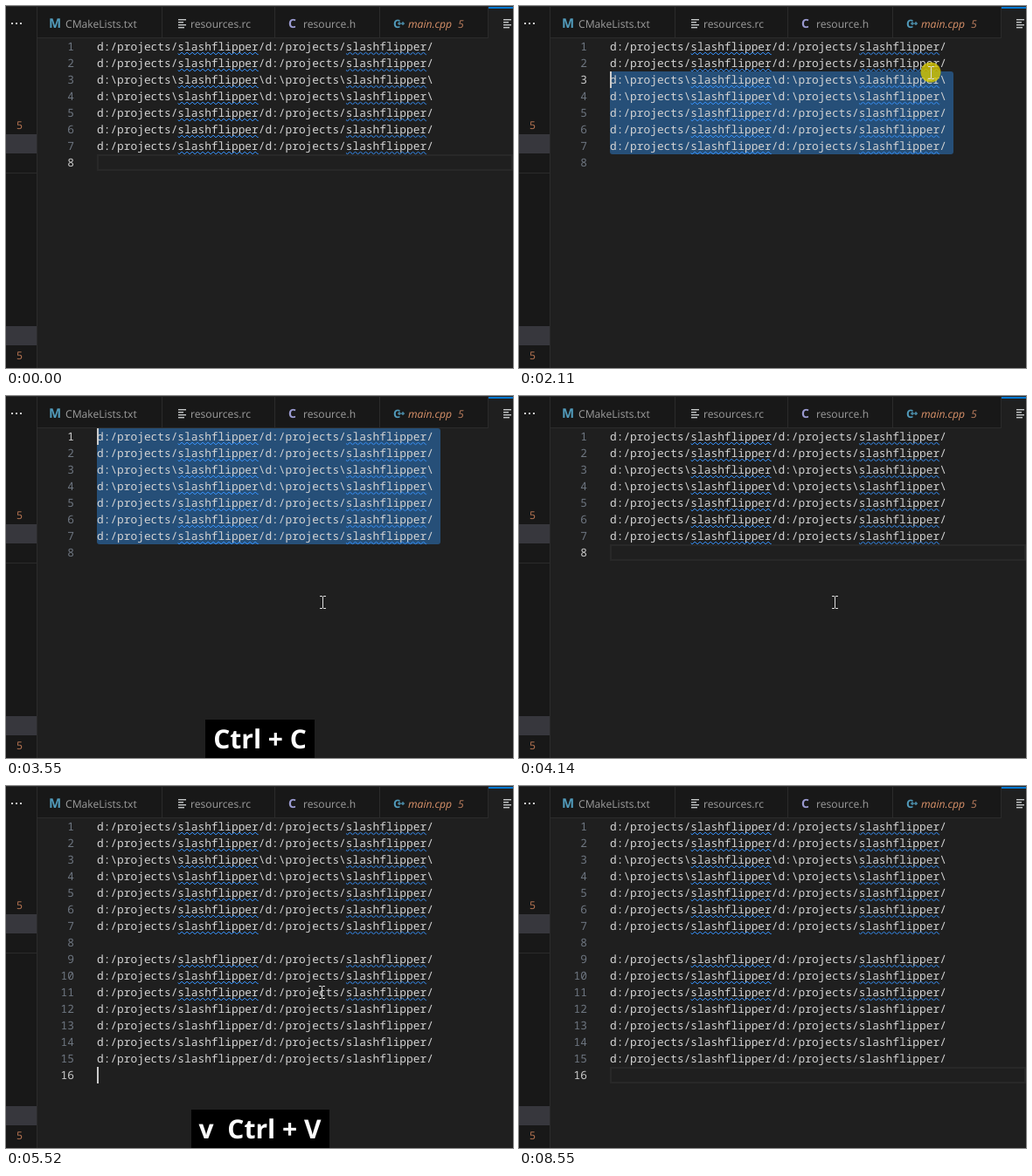
An HTML page with a canvas for the animation above (8650 ms loop, 580 by 415 pixels).

```html
<!DOCTYPE html>
<html lang="en">
<head>
<meta charset="utf-8">
<title>Editor</title>
<style>
html, body { margin: 0; width: 100%; height: 100%; overflow: hidden; background: #1f1f1f; }
canvas { display: block; }
</style>
</head>
<body>
<canvas id="stage" width="580" height="415"></canvas>
<script>
const ctx = document.getElementById('stage').getContext('2d');
const LOOP = 8650, TOP = 37, ROW = 19, LEFT = 104;
const MONO = '12.83px "Noto Sans Mono", monospace';
const UI = '12.15px "Open Sans", sans-serif';
const KEYS = 'bold 30px "Open Sans", sans-serif';
const CHAR = 7.697;
const slashed = 'd:/projects/slashflipper/'.repeat(2);
const flipped = slashed.replaceAll('/', '\\');

// Pointer stops: time, x, y
const path = [
  [310, 547, 406], [510, 536, 345], [810, 515, 230], [1110, 502, 159],
  [1810, 502, 159], [1910, 497, 140], [2010, 485, 110], [2110, 471, 76],
  [2310, 470, 53], [3210, 470, 53], [3510, 362, 236], [4109, 362, 236],
  [4110, 361, 236], [7610, 361, 236], [7910, 519, 377]
];
const blinks = [1410, 2830, 3330, 4140, 4540, 5040, 5140, 5840, 6340, 6840, 7340, 7850, 8350, 8550];
const activeRows = [[0, 8], [1410, 7], [1710, 8], [3650, 8], [4540, 9], [5140, 16]];
const keyLabels = [
  [0, ''], [3330, 'Ctrl + C'], [4040, ''], [4540, 'Enter'], [5040, 'Enter  v'],
  [5140, 'Enter  v  Ctrl + V'], [5520, 'v  Ctrl + V'], [6060, 'Ctrl + V'], [6340, '']
];

const within = (t, a, b) => t >= a && t < b;
const latest = (list, t) => list.findLast(e => e[0] <= t)[1];
const rowTop = row => TOP + (row - 1) * ROW;

function box(x, y, w, h, color) {
  ctx.fillStyle = color;
  ctx.fillRect(x, y, w, h);
}

function label(text, x, y, color, font = UI, align = 'left') {
  ctx.font = font;
  ctx.textAlign = align;
  ctx.fillStyle = color;
  ctx.fillText(text, x, y);
}

function pointerAt(t) {
  const q = Math.floor((t - 10) / 100) * 100 + 10;
  const i = path.findIndex(p => p[0] > q);
  if (i < 1) return i ? path.at(-1).slice(1) : path[0].slice(1);
  const [a, b] = [path[i - 1], path[i]];
  const f = (q - a[0]) / (b[0] - a[0]);
  return [1, 2].map(k => Math.round(a[k] + (b[k] - a[k]) * f));
}

function listIcon(x) {
  [9, 6, 9, 7].forEach((w, i) => box(x, 15 + i * 3, w, 1.4, '#c5c8c9'));
}

function chrome() {
  box(0, 0, 580, 415, '#1f1f1f');
  box(0, 0, 35, 415, '#181818');
  box(36, 0, 515, 36, '#181818');
  box(0, 0, 580, 1, '#2b2b2b');
  box(36, 36, 516, 1, '#2b2b2b');
  for (const x of [178, 307, 427, 551]) box(x, 1, 1, 36, '#2b2b2b');
  box(552, 1, 28, 2, '#0078d4');
  box(35, 0, 1, 415, '#2b2b2b');
  box(0, 191, 35, 1, '#2b2b2b');
  for (const x of [6, 11, 16]) box(x, 19, 2, 2, '#cccccc');
  for (const y of [147, 367]) box(0, y, 35, 22, '#37373d');
  for (const y of [141, 405]) label('5', 12, y, '#c07a55');

  label('M', 49, 25, '#519aba', 'bold 15px "Open Sans", sans-serif');
  label('CMakeLists.txt', 68, 25, '#9d9d9d');
  listIcon(197);
  label('resources.rc', 211, 25, '#9d9d9d');
  label('C', 323, 25, '#9a9ad0', 'bold 14px "Open Sans", sans-serif');
  label('resource.h', 340, 25, '#9d9d9d');
  label('C', 443, 25, '#519aba', 'bold 13px "Open Sans", sans-serif');
  for (const x of [448, 452]) {
    box(x, 19.5, 4, 1.2, '#519aba');
    box(x + 1.4, 18, 1.2, 4, '#519aba');
  }
  label('main.cpp', 460, 25, '#d9926a', 'italic ' + UI);
  label('5', 517, 25, '#c08060', 'italic ' + UI);
  listIcon(569);
}

function squiggle(x, y, w) {
  ctx.save();
  ctx.beginPath();
  ctx.rect(x, y - 0.5, w, 4);
  ctx.clip();
  ctx.beginPath();
  ctx.moveTo(x, y + 1.3);
  for (let i = 0; i * 3 < w + 3; i++) ctx.lineTo(x + 1.75 + i * 3, y + (i % 2 ? 0.2 : 2.8));
  ctx.strokeStyle = '#3794ff';
  ctx.lineWidth = 1;
  ctx.stroke();
  ctx.restore();
}

function codeRow(row, active, marked) {
  const y = rowTop(row);
  label(row, 78, y + 14, row === active ? '#cccccc' : '#6e7681', MONO, 'right');
  if (row === 8 || row === 16 || (row === 9 && !marked.pasted)) return;
  label(row === 3 || row === 4 ? flipped : slashed, LEFT, y + 14, '#d4d4d4', MONO);
  if (row <= marked.last) for (const col of [12, 37]) squiggle(LEFT + col * CHAR, y + 16, 12 * CHAR);
}

function pointer(x, y, pressed) {
  if (pressed) {
    ctx.beginPath();
    ctx.arc(x, y, 11.5, 0, Math.PI * 2);
    ctx.fillStyle = 'rgba(215,200,0,.8)';
    ctx.fill();
  }
  const color = '#dedede';
  box(x, y - 6, 1, 13, color);
  for (const dy of [-7, 7]) {
    box(x - 3, y + dy, 3, 1, color);
    box(x + 1, y + dy, 3, 1, color);
  }
}

function draw(t) {
  const [mx, my] = pointerAt(t);
  const selecting = within(t, 1710, 3650);
  const dragging = within(t, 1910, 3650);
  const firstRow = t > 2310 ? 1 : Math.min(7, Math.floor((my - TOP) / ROW) + 1);
  const active = dragging ? firstRow : latest(activeRows, t);
  const caretOn = blinks.filter(b => b <= t).length % 2 === 1;
  const pasted = t >= 5140;
  const rows = pasted ? 16 : t >= 4540 ? 9 : 8;

  chrome();
  if (selecting) {
    const y = rowTop(firstRow);
    ctx.beginPath();
    ctx.roundRect(LEFT, y, 393, rowTop(8) - y, 3);
    ctx.fillStyle = '#264f78';
    ctx.fill();
  } else if (!caretOn) {
    ctx.strokeStyle = '#282828';
    ctx.lineWidth = 2;
    ctx.strokeRect(LEFT + 1, rowTop(active) + 1, 474, ROW - 2);
  }
  for (let r = 1; r <= rows; r++) codeRow(r, active, { pasted, last: t >= 5240 ? 11 : 7 });
  if (caretOn) box(active === 7 && !selecting ? 488 : LEFT, rowTop(active), 2, ROW, '#cccccc');

  if (within(t, 290, 8050)) {
    pointer(mx, my, within(t, 1410, 1510) || within(t, 1710, 2630) || within(t, 3650, 3730));
  }
  const keys = latest(keyLabels, t);
  if (keys) {
    ctx.font = KEYS;
    const w = Math.round(ctx.measureText(keys).width) + 18;
    box(Math.round(290.5 - w / 2), 371, w, 44, '#000');
    label(keys, 290.5, 404, '#fff', KEYS, 'center');
  }
}

ctx.textRendering = 'geometricPrecision';
const start = performance.now();
function tick() {
  draw((performance.now() - start) % LOOP);
  requestAnimationFrame(tick);
}
tick();
</script>
</body>
</html>
```
